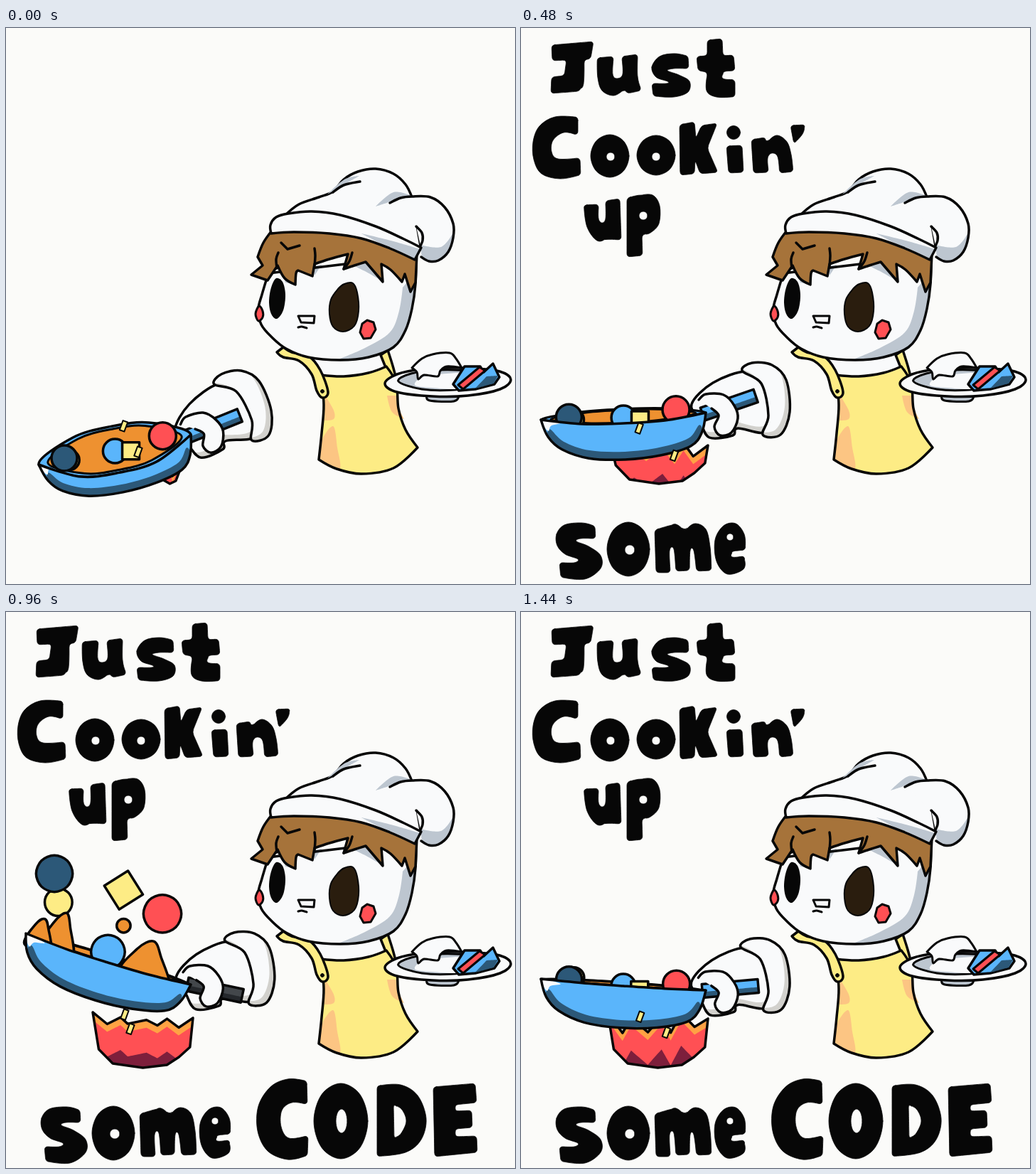
An HTML page with a canvas that plays this animation: 716x782 px, repeating every 1.56 s.

```html
<!DOCTYPE html>
<html lang="en">
<meta charset="utf-8">
<title>Just Cookin' up some CODE</title>
<style>
  html, body { margin: 0; width: 100%; height: 100%; overflow: hidden; background: #fbfbf9; }
  canvas { display: block; }
</style>
<canvas id="stage" width="716" height="782" role="img" aria-label="Just Cookin' up some CODE"></canvas>
<script>
const ctx = document.getElementById('stage').getContext('2d');
const PAPER = '#fbfbf9', INK = '#070707', BLUE = '#5ab5fb', NAVY = '#2c5878', GREY = '#bdc6d0', WARM = '#d2d1cd',
      YELLOW = '#fdec85', PEACH = '#fcc583', RED = '#ff5054', ORANGE = '#ee9130', WHITE = '#f9fafb';
const STEP = 120, STEPS = 13;

// Points "x,y" joined by a smooth curve. "!" makes a corner, a leading "^" makes
// every point a corner, "~" leaves the curve open, "/" starts another subpath.
function trace(spec, round = 0) {
  const path = new Path2D();
  for (const part of spec.split('/')) {
    const open = part[0] === '~', sharp = part[0] === '^';
    const pts = part.replace(/^[~^]/, '').split(' ').map(s => {
      const [x, y] = s.split(',').map(parseFloat);
      return { x, y, corner: sharp || s.endsWith('!') };
    });
    const n = pts.length;
    const at = i => pts[open ? Math.min(n - 1, Math.max(0, i)) : (i + n) % n];
    const cut = (i, j) => {
      const p = at(i), q = at(j);
      const k = p.corner && round ? Math.min(.4, round / Math.hypot(q.x - p.x, q.y - p.y)) : 0;
      return { x: p.x + (q.x - p.x) * k, y: p.y + (q.y - p.y) * k };
    };
    const handle = (i, j) => {
      const p = cut(i, j), k = at(i).corner ? 0 : (j - i) / 6;
      return [p.x + (at(i + 1).x - at(i - 1).x) * k, p.y + (at(i + 1).y - at(i - 1).y) * k];
    };
    path.moveTo(cut(0, 1).x, cut(0, 1).y);
    for (let i = 0; i < (open ? n - 1 : n); i++) {
      const end = cut(i + 1, i), corner = at(i + 1), next = cut(i + 1, i + 2);
      path.bezierCurveTo(...handle(i, i + 1), ...handle(i + 1, i), end.x, end.y);
      if (corner.corner) path.quadraticCurveTo(corner.x, corner.y, next.x, next.y);
    }
    if (!open) path.closePath();
  }
  return path;
}

function oval(x, y, rx, ry = rx) {
  return Array.from({ length: 8 }, (_, i) => {
    const a = i * Math.PI / 4;
    return `${x + rx * Math.cos(a)},${y + ry * Math.sin(a)}`;
  }).join(' ');
}

function paint(spec, fill, width = 3.5, round = 0) {
  const path = trace(spec, round);
  if (fill) { ctx.fillStyle = fill; ctx.fill(path, 'evenodd'); }
  if (width) { ctx.lineWidth = width; ctx.strokeStyle = INK; ctx.stroke(path); }
}

function placed(x, y, degrees, draw) {
  ctx.save();
  ctx.translate(x, y);
  ctx.rotate(degrees * Math.PI / 180);
  draw();
  ctx.restore();
}

// Fills the shape, then lays shifted copies [dx, dy, colour] inside it.
function layered(spec, base, ...copies) {
  const path = trace(spec);
  paint(spec, base, 0);
  ctx.save();
  ctx.clip(path);
  for (const [dx, dy, color] of copies) placed(dx, dy, 0, () => {
    ctx.fillStyle = color;
    ctx.fill(path);
  });
  ctx.restore();
  paint(spec);
}

const words = [
  [ '43,24! 102,19! 98,43! 89,45! 88,78 82,89! 42,92! 43,69! 61,67! 64,45! 44,46!',
    '107,42! 130,40! 129,65 135,71 143,65 142,40! 164,37! 164,68 169,88! 150,92! 146,87! 130,95 114,88 108,70',
    '184,55 195,40 215,36 235,39! 236,57! 215,57 206,60 222,66 237,75 235,90 215,97 186,96! 184,78! 205,78 206,75 190,69',
    '262,17! 283,15! 284,39! 299,38! 301,60! 284,61! 284,71 301,73! 301,97! 275,97 261,88 262,62! 249,60! 247,40! 262,39!' ],
  [ '80,125! 80,150! 60,147 45,158 43,174 52,184 83,183! 84,207! 55,212 29,205 18,185 17,160 26,138 48,125',
    oval(125, 180, 27, 30) + '/' + oval(126, 181, 6),
    oval(190, 179, 27, 28) + '/' + oval(190, 181, 6),
    '223,136! 244,132! 246,155! 254,137! 276,134! 262,169! 277,203! 252,205! 245,186! 244,205! 224,207!',
    oval(299, 147, 9.5) + '/289,166! 311,165! 313,203! 292,204!',
    '324,157! 343,154! 345,160! 360,151 374,160 380,178 383,202! 364,204! 361,181 353,176 347,183 348,203! 327,204!',
    '379,137! 400,136! 396,149 384,163!' ],
  [ '88,249! 109,248! 109,268 114,274 119,268 119,243! 139,240! 141,298! 122,297! 107,299 93,280',
    '149,239! 165,235! 185,235 195,250 194,275 182,288 170,291! 171,320! 149,322!/' + oval(172, 264, 6) ],
  [ '50,712 61,699 85,696 104,700! 105,718! 84,718 78,722 95,729 112,742 112,760 90,775 56,773! 54,752! 75,752 80,747 62,740 51,728',
    oval(151, 733, 30, 38) + '/' + oval(153, 734, 7),
    '188,706! 208,700! 218,698 230,706! 245,697 260,705 266,730 268,763! 247,764! 243,735 238,735 237,763! 218,764! 215,733 209,735 210,766! 190,766!',
    '316,734! 296,736! 297,744 315,743! 313,761 290,768 275,750 273,720 285,700 302,697 314,712/' + oval(294, 716, 5) ],
  [ '423,659! 424,692! 402,690 388,701 387,724 398,740 425,737! 424,765! 396,770 368,758 354,730 355,695 372,668 396,657',
    oval(471, 716, 38, 53) + '/' + oval(472, 716, 8, 17),
    '522,666! 555,665 579,680 591,712 584,742 562,760 522,766!/545,692! 557,700 563,716 556,733 546,741!',
    '601,668! 660,663! 662,690! 632,693! 632,702! 655,701! 656,725! 632,727! 632,738! 662,737! 663,760! 603,766!' ]
];

function drawChef() {
  // Neck and apron
  paint('425,455! 430,478 443,490! 490,492 535,480! 535,450!', WHITE);
  paint('527,460! 537,453! 544,475 549,494! 540,492!', YELLOW);
  const apron = '443,488! 447,530 444,570 440,607! 465,620 500,627 545,619 579,590! 562,565 552,535 549,500 535,476! 510,485 475,490';
  paint(apron, YELLOW, 0);
  paint('443,582 460,560 466,590 469,621 440,607!', PEACH, 0);
  paint('449,517! 461,538 461,550 448,552!', PEACH, 0);
  paint('536,517! 551,517! 553,535 560,550! 543,540', PEACH, 0);
  paint(apron);
  paint('381,456! 390,449! 402,456 425,461 442,481 453,512 445,520 437,510 430,487 412,468 390,463', YELLOW);
  paint(oval(445, 511, 2.5), INK, 1);

  // Head
  const face = '369,345! 360,375 355,395 359,417 374,435 394,451 425,463 470,467 510,463 545,449 562,425 571,395 576,360 577,320!';
  paint(face, WHITE, 0);
  paint('575,345! 571,395 562,425 545,449 510,463 465,467! 505,450 540,428 553,398 558,365!', GREY, 0);
  paint('^480,330 510,325 528,355 505,342', GREY, 0);
  paint('^384,335 407,361 393,358', GREY, 0);
  paint('^432,335 444,333 434,348', GREY, 0);
  paint(face);
  paint('380,352 389,357 393,375 390,397 381,409 373,402 370,385 373,365', INK, 0);
  paint('476,360 488,359 494,372 496,398 490,419 474,427 460,420 455,402 457,382 467,367', '#2a1d0e', 2);
  paint('^411,405 434,405 433,415 415,414', WHITE, 3);
  paint('~411,421 416,420 423,422', null, 3);
  paint('356,391 361,398 361,407 355,412 351,402', RED, 3);
  paint('^508,411 517,414 520,424 513,436 503,437 498,428 501,416', RED, 3);
  paint('374,285! 362,302 354,322! 361,334! 345,347! 368,355! 382,334! 392,352 407,361! 408,345 411,341! 431,349! 434,332! 455,325 481,318! 475,339! 490,334 506,329! 530,357! 528,332! 541,340 557,357! 561,346! 569,371! 576,358! 578,318! 480,275!', '#a6733a');
  paint('~383,316 380,325 381,338');
  paint('~434,310 435,320 434,335');
  paint('~475,339! 483,328 487,316');
  paint('~387,302! 396,311! 413,306!');

  // Hat
  paint('392,264! 412,248 440,238 460,230 475,213 495,202 520,198 545,205 562,220 571,238! 584,312!', WHITE);
  const puff = '571,237 597,238 617,252 629,275 629,295 622,315 608,327 595,328 584,322';
  paint('584,310! 577,279! 545,245 ' + puff, WHITE, 0);
  paint('520,251! 545,231 570,236! 545,243', GREY, 0);
  paint('452,234! 476,213 497,208! 476,220', GREY, 0);
  paint('585,322! 600,328 620,318 629,288! 612,308 583,305!', GREY, 0);
  paint('~540,246 555,239 ' + puff);
  paint('~577,279 585,288 586,299 581,310');
  paint('~460,231 475,221 498,216');
  const band = '373,289! 372,277 380,266 397,261 430,258 470,263 520,279 560,297 584,309! 575,326! 540,310 500,296 455,289 405,287';
  paint(band, WHITE, 0);
  paint('500,289! 545,300 582,311! 575,326! 540,310', GREY, 0);
  paint(band);

  // Plate
  paint('592,517! 596,524 630,525 637,517!', GREY, 3);
  paint('533,500 550,487 585,480 635,478 690,482 710,494 695,508 650,517 600,518 550,512', WHITE);
  paint('552,497 570,486 610,481 655,483 675,490 668,502 630,509 585,508', GREY, 3);
  paint('600,506 575,502 590,490 640,485 655,492 640,507', WHITE, 0);
  paint('571,478! 585,465 600,459 624,457 633,465 641,478! 620,476 611,482 607,490 588,488 580,494 578,484', WHITE, 3);
  paint('^629,501 645,476 667,476 672,484 685,472 694,491 687,501 660,508 637,510', BLUE);
  paint('^676,490 692,489 686,500 660,507', NAVY, 0);
  paint('^636,502 643,508 674,482 666,477', RED, 3);
}

// Value of a quantity that moves evenly between its settings at the key steps.
function track(...values) {
  const keys = [0, 3, 4, 6, 8, 10, 12];
  return step => {
    const k = Math.max(0, keys.findIndex(key => key >= step) - 1);
    return values[k] + (values[k + 1] - values[k]) * (step - keys[k]) / (keys[k + 1] - keys[k]);
  };
}

const tipY = track(614, 574, 551, 488, 452, 452, 516);    // far end of the pan
const heelY = track(572, 553, 541, 522, 524, 524, 532);   // end at the handle
const sag = track(33, 22, 10, -10, 5, 5, 2);              // how far the near lip dips
const handTurn = track(-16, -13, 0, 10, -3, -3, -2);
const handleTurn = track(-22, -26, -19, 14, 12, 12, -5);
const hop = (step, peak) => Math.max(0, 1 - ((step - peak) / 2.6) ** 2);

function random(seed) {
  return () => {
    seed = (seed * 16807 + 11) % 2147483647;
    return seed / 2147483647;
  };
}

function drawFlame(step) {
  const rand = random(step * 977 + 5);
  const left = Math.max(122, 213 - 22 * step), right = Math.min(263, 248 + 4 * step);
  const top = Math.max(562, 603 - 6 * step), width = right - left;
  const tips = Array.from({ length: 9 }, (_, i) => {
    const x = left + width * (i + (i % 8 ? rand() - .5 : 0) * .6) / 8;
    return `${x},${top + rand() * 14 + (i % 2 ? 17 : 0)}`;
  });
  const base = [[.97, 612], [.86, 626], [.74, 637], [.5, 641], [.2, 635], [.06, 615]]
    .map(([u, y]) => `${left + width * u},${y}`);
  layered('^' + [...tips, ...base].join(' '), '#ffa244', [0, 11, RED], [0, 46, '#7d1f3c']);
}

function drawHand(step, x, y) {
  const dark = step >= 6 && step < 10;
  placed(x, y, handTurn(step), () => {
    layered('-20,-12 10,-42 58,-58 90,-40 90,25 45,22 38,32 5,35 -8,12', WARM, [-5, -9, WHITE]);
    layered('51,-59 65,-70 93,-67 113,-46 118,-1 105,31 80,31 88,4 78,-41', WARM, [-7, -7, WHITE]);
  });
  placed(x, y, handleTurn(step), () =>
    layered('^-5,-9 74,-9 74,10 -5,10', dark ? '#25282c' : NAVY, [0, -8, dark ? '#43474b' : BLUE]));
}

function drawFingers(step, x, y) {
  placed(x, y, handTurn(step), () =>
    paint('~-10,-18 0,-26 25,-25 40,-10 45,8 36,28 20,32 12,20 18,4 8,-6', WHITE));
}

// color, place along the pan, height in the pan, radius, throw height, step of the peak
const food = [
  [YELLOW, .2, 2, 14, 90, 9.5],
  [NAVY, .17, -2, 18, 98, 8.5],
  [BLUE, .5, 2, 17, 14, 9],
  [ORANGE, .6, 6, 2, 62, 8.5],
  [YELLOW, .6, 6, 12, 114, 8.5],
  [RED, .82, -6, 19, 84, 8.5]
];

function drawPan(step) {
  const tip = { x: 28 + 18 * Math.max(0, 1 - step / 3), y: tipY(step) };
  const heel = { x: 260, y: heelY(step) };
  const dip = sag(step), lift = Math.max(3, dip);
  const dx = heel.x - tip.x, dy = heel.y - tip.y, length = Math.hypot(dx, dy);
  // u runs from tip to heel, v in pixels away from the line between them
  const at = (u, v) => [tip.x + dx * u - dy / length * v, tip.y + dy * u + dx / length * v];
  const line = points => points.map(([u, v]) => at(u, v).join()).join(' ');

  drawFlame(step);
  drawHand(step, heel.x, heel.y);
  const opening = inset => line([[0, 0], [.25, -.85], [.5, -1], [.75, -.85], [1, 0], [.75, .85], [.5, 1], [.25, .85]]
    .map(([u, v]) => [.5 + (u - .5) * inset, v * (v < 0 ? lift : dip) * inset]));
  paint(opening(1), BLUE);
  paint(opening(.88), ORANGE, 3);

  const swell = hop(step, 9);
  const hill = (u, w, h) => swell && paint(line(
    [[u - w, 15], [u - w * .6, -h * .6 * swell], [u, -h * swell], [u + w * .5, -h * .6 * swell], [u + w * 1.2, 15]]), ORANGE);
  food.forEach(([color, u, v, r, height, peak], i) => {
    const fly = hop(step, peak), [x, y] = at(u, v), size = r + 8 * fly;
    if (i === 3) { hill(.19, .09, 52); hill(.08, .07, 32); hill(.72, .13, 50); }
    if (i === 4) placed(x, y - height * fly, 60 * fly, () =>
      paint(`^${-size},${-size} ${size},${-size} ${size},${size} ${-size},${size}`, color));
    else paint(oval(x, y - height * fly, size), color);
  });

  const bottom = [[.97, 28], [.9, 46], [.72, 57], [.5, 61], [.28, 57], [.12, 43], [.04, 25]];
  const lip = line([[.25, .85 * dip], [.5, dip], [.75, .85 * dip]]);
  const body = `${at(0, 0)}! ${lip} ${at(1, 0)}! ${line(bottom)}`;
  const inner = bottom.map(([u, v]) => [.5 + (u - .5) * .97, v - 11]).reverse();
  paint(body, BLUE, 0);
  ctx.save();
  ctx.clip(trace(body));
  paint(line([...bottom, ...inner]), NAVY, 0);
  paint(line([[0, 0], [.12, 5], [.06, 9], [.04, 16]]), WHITE, 0);
  ctx.restore();
  paint(body);
  drawFingers(step, heel.x, heel.y);

  const rand = random(step * 331 + 17);
  for (const y of [555, 585])
    placed(165 + rand() * 70, y + rand() * 20, 20, () => paint('^-3,-7 4,-7 4,7 -3,7', YELLOW, 2));
}

let shown = -1;
function frame(now) {
  const step = Math.floor(now / STEP) % STEPS;
  if (step !== shown) {
    shown = step;
    ctx.fillStyle = PAPER;
    ctx.fillRect(0, 0, 716, 782);
    ctx.lineJoin = ctx.lineCap = 'round';
    words.slice(0, step).flat().forEach(letter => paint(letter, INK, .8, 5));
    drawChef();
    drawPan(step);
  }
  requestAnimationFrame(frame);
}
requestAnimationFrame(frame);
</script>
</html>
```
